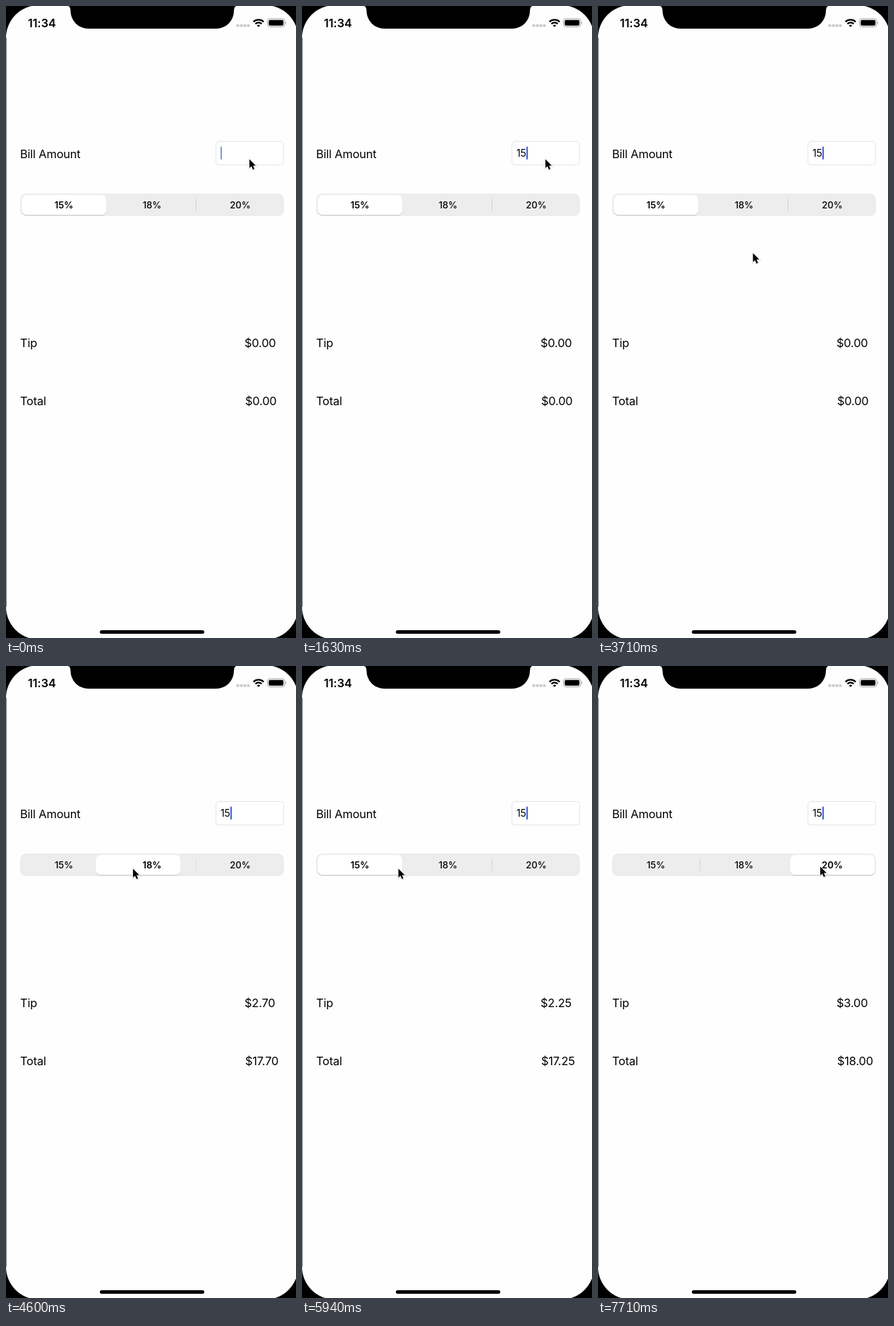
These frames come from a looping animation (411 by 893 pixels, 8000 ms). An HTML page:

```html
<!DOCTYPE html>
<html lang="en">
<head>
<meta charset="utf-8">
<title>Tip calculator</title>
<style>
html, body { margin: 0; width: 100%; height: 100%; overflow: hidden; background: #000; }
svg { display: block; width: 411px; height: 893px; }
text { font-family: Inter, "Liberation Sans", sans-serif; fill: #000; }
.body { font-size: 16.4px; letter-spacing: -.18px; }
.seg { font-size: 13.1px; text-anchor: middle; letter-spacing: -.05px; }
</style>
</head>
<body>
<svg viewBox="0 0 411 893">
  <rect width="411" height="893"/>
  <rect y="-1" width="414" height="896" rx="46" fill="#fefefe"/>
  <path d="M.5 45V849" stroke="#000" stroke-opacity=".5"/>
  <path d="M88 0Q91.5 1 91.5 7A25 25 0 0 0 116.5 32H298A25 25 0 0 0 323 7Q323 1 326.5 0Z"/>

  <text x="31" y="29.5" font-size="16.2" font-weight="600" letter-spacing="-.05">11:34</text>
  <g fill="#c8c8ca">
    <rect x="326.5" y="26" width="4" height="3.5" rx="1"/>
    <rect x="331.5" y="26" width="4" height="3.5" rx="1"/>
    <rect x="336.5" y="26" width="4" height="3.5" rx="1"/>
    <rect x="341.5" y="26" width="4" height="3.5" rx="1"/>
  </g>
  <g fill="none" stroke="#000" stroke-width="2.1">
    <path d="M350.7 22.4A10.2 10.2 0 0 1 365.1 22.4"/>
    <path d="M353.4 25.3A6.3 6.3 0 0 1 362.4 25.3"/>
  </g>
  <path d="M355.6 27.5A3.4 3.4 0 0 1 360.2 27.5L357.9 29.8Z"/>
  <rect x="370.5" y="18" width="24.5" height="11.5" rx="3.4" fill="none" stroke="#a5a5a5"/>
  <rect x="372.3" y="19.8" width="20.9" height="7.9" rx="1.8"/>
  <path d="M396.2 21.8Q398.2 23.7 396.2 25.7Z" fill="#a0a0a0"/>

  <text class="body" x="20" y="214.5">Bill Amount</text>
  <rect x="297.5" y="191.5" width="96" height="33" rx="4" fill="#fff" stroke="#e4e4e4"/>
  <text id="bill" x="304" y="213.2" font-size="14" letter-spacing="-.2"></text>
  <rect id="caret" y="198.5" width="2" height="18.5" rx="1" fill="#3f61dc"/>

  <rect x="20" y="265" width="374" height="32" rx="8.5" fill="#ededed"/>
  <rect id="div0" x="144" y="272" width="1" height="18" fill="#d3d3d5"/>
  <rect id="div1" x="269" y="272" width="1" height="18" fill="#d3d3d5"/>
  <g id="pill">
    <rect x="-.5" y="267" width="121.5" height="29.2" rx="7.2" opacity=".05"/>
    <rect x="0" y="267.5" width="120.5" height="28.5" rx="7" opacity=".09"/>
    <rect y="267" width="120.5" height="28" rx="6.8" fill="#fff"/>
  </g>
  <text class="seg" x="82" y="285.6">15%</text>
  <text class="seg" x="207" y="285.6">18%</text>
  <text class="seg" x="332" y="285.6">20%</text>

  <text class="body" x="20" y="481.5">Tip</text>
  <text class="body" id="tip" x="338" y="481.5"></text>
  <text class="body" x="20" y="563.5">Total</text>
  <text class="body" id="total" x="339" y="563.5"></text>

  <rect x="133" y="882" width="148" height="5" rx="2.5"/>
  <g id="mouse">
    <path d="M0 1V13.5L3 11L5 15.6L7.3 14.6L5.4 10H9.4Z" fill="none" stroke="#000" stroke-opacity=".12" stroke-width="2.4"/>
    <path d="M0 .5V13L2.9 10.3L4.9 15.1L7.1 14.2L5.1 9.5H9Z" stroke="#fff" stroke-width="1.5" paint-order="stroke"/>
  </g>
</svg>
<script>
const $ = id => document.getElementById(id);
const segs = [...document.querySelectorAll('.seg')];
const LOOP = 8000, TICK = 148.3, SLIDE = 300;
const RATES = [.15, .18, .2];
const pillX = i => 22 + 125 * i;

// pointer stops: time, x, y
const stops = [
  [0, 345, 216], [2080, 345, 216], [2230, 337, 230], [2530, 270.5, 277],
  [2830, 234, 352], [3120, 229, 370], [3560, 229, 364], [4300, 182, 288],
  [4450, 180, 286], [4750, 180, 286], [5250, 128, 286], [5900, 132, 286],
  [6300, 190, 285], [6450, 205, 284], [6820, 313, 283], [7120, 315, 283], [LOOP, 315, 283]
];
// taps on the segments: time, index
const taps = [[4460, 1], [5320, 0], [6330, 1], [7390, 2]];

function pointer(t) {
  const k = stops.findIndex(s => s[0] > t);
  const [t0, x0, y0] = stops[k - 1], [t1, x1, y1] = stops[k];
  const p = (t - t0) / (t1 - t0);
  return [x0 + (x1 - x0) * p, y0 + (y1 - y0) * p];
}

function draw(time) {
  const n = Math.floor((time % LOOP + 8) / TICK);
  const t = n * TICK;

  const bill = n < 4 ? '' : n < 5 ? '1' : '15';
  $('bill').textContent = bill;
  $('caret').setAttribute('x', [304, 310, 318][bill.length]);
  const beat = n % 7;
  $('caret').setAttribute('opacity', beat === 0 ? .65 : beat < 3 ? 0 : 1);

  let from = 0, to = 0, start = -SLIDE;
  for (const [at, i] of taps) if (t >= at) [from, to, start] = [to, i, at];
  const p = Math.min(1, (t - start) / SLIDE);
  const mix = (a, b, k) => a + (b - a) * k;
  const x = mix(pillX(from), pillX(to), 1 - (1 - p) ** 3);
  $('pill').setAttribute('transform', `translate(${x} 0)`);
  $('div0').setAttribute('opacity', mix(+(from === 2), +(to === 2), p));
  $('div1').setAttribute('opacity', mix(+(from === 0), +(to === 0), p));
  segs.forEach((s, i) => s.setAttribute('font-weight', i === to ? 600 : 500));

  const amount = start < 0 ? 0 : 15, tip = amount * RATES[to];
  $('tip').textContent = '$' + tip.toFixed(2);
  $('total').textContent = '$' + (amount + tip).toFixed(2);
  $('mouse').setAttribute('transform', `translate(${pointer(t)})`);
}

function loop() {
  draw(performance.now());
  requestAnimationFrame(loop);
}
loop();
</script>
</body>
</html>
```
